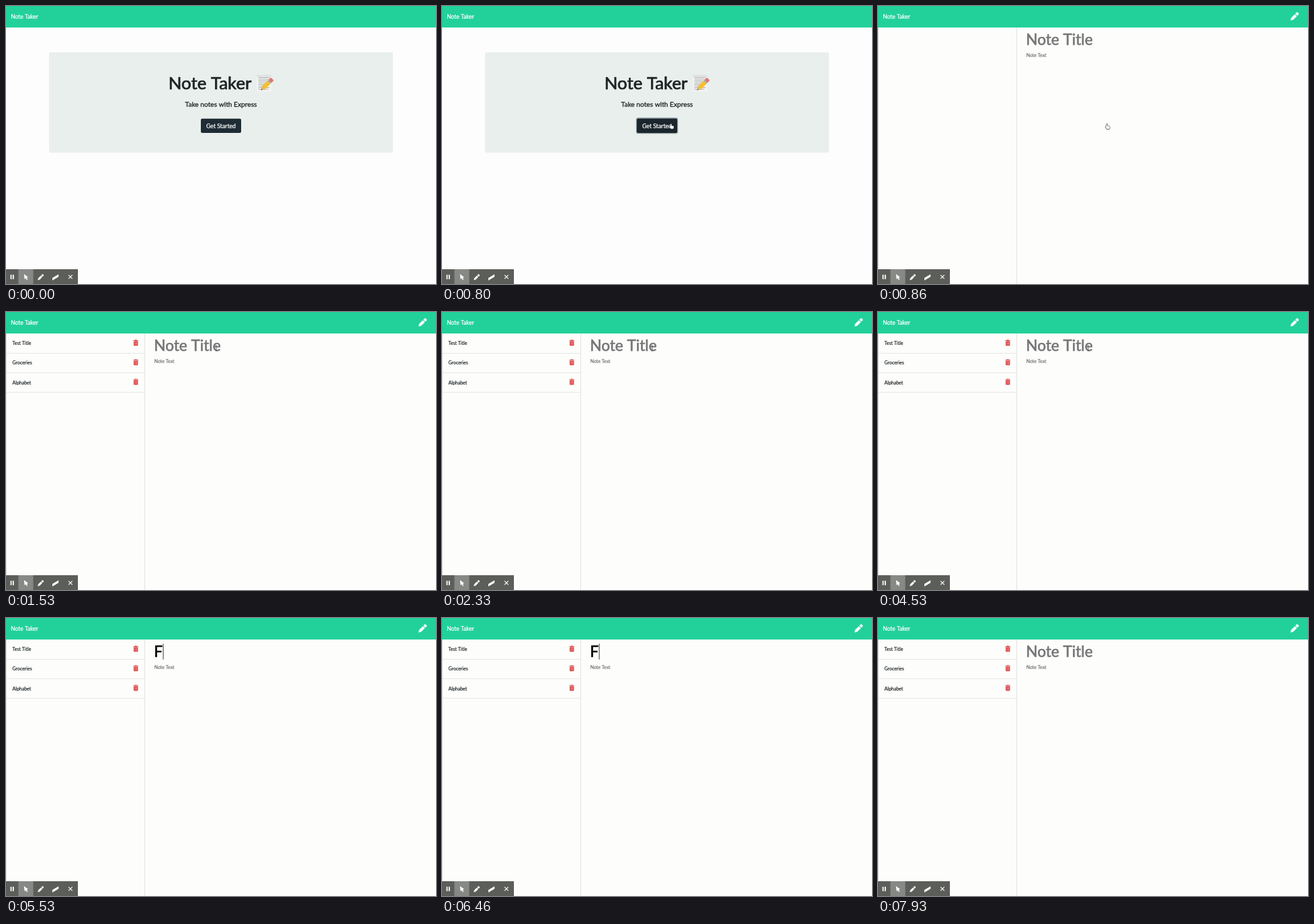
Recreate the animation shown at these times as an HTML page with a canvas. Size 640 px wide and 414 px high, loop 8 s.

```html
<!DOCTYPE html>
<html lang="en">
<head>
<meta charset="utf-8">
<title>Note Taker</title>
<style>
html, body { margin: 0; width: 100%; height: 100%; overflow: hidden; background: #fefefe; }
canvas { display: block; width: 640px; height: 414px; }
</style>
</head>
<body>
<canvas id="stage"></canvas>
<script>
const W = 640, H = 414, LOOP = 8000;
const GREEN = '#22d19a', INK = '#1d2224', RED = '#dc4545', MUTED = '#757575';
const BLINK = 500;

// Moments of the story, in ms.
const CLICK = 800, OPEN = 860, LIST = 930, FOCUS = 1800;
const TYPE = 5530, ERASE = 6060, RETYPE = 6460, CLEAR = 7930;

const canvas = document.getElementById('stage');
const ctx = canvas.getContext('2d');
const dpr = window.devicePixelRatio || 1;
canvas.width = W * dpr;
canvas.height = H * dpr;

function rect(x, y, w, h, color) {
  ctx.fillStyle = color;
  ctx.fillRect(x, y, w, h);
}

function round(x, y, w, h, r, color) {
  ctx.fillStyle = color;
  ctx.beginPath();
  ctx.roundRect(x, y, w, h, r);
  ctx.fill();
}

function line(x1, y1, x2, y2, color, width) {
  ctx.strokeStyle = color;
  ctx.lineWidth = width;
  ctx.beginPath();
  ctx.moveTo(x1, y1);
  ctx.lineTo(x2, y2);
  ctx.stroke();
}

function wedge(x, half, color) {
  ctx.fillStyle = color;
  ctx.beginPath();
  ctx.moveTo(0, 0);
  ctx.lineTo(x, -half);
  ctx.lineTo(x, half);
  ctx.fill();
}

// A thin stroke gives the slightly heavy look of screen text.
function text(str, x, y, size, color, align = 'left') {
  ctx.font = `400 ${size}px Lato, sans-serif`;
  ctx.textAlign = align;
  ctx.fillStyle = ctx.strokeStyle = color;
  ctx.lineWidth = size * 0.028;
  ctx.lineJoin = 'round';
  ctx.fillText(str, x, y);
  ctx.strokeText(str, x, y);
}

function at(x, y, angle, scale, paint) {
  ctx.save();
  ctx.translate(x, y);
  ctx.rotate(angle);
  ctx.scale(scale, scale);
  paint();
  ctx.restore();
}

// Pen with its tip at x, y, pointing to the lower left.
function pen(x, y, length, color, half = 2, tip = color, cap = color) {
  at(x, y, -Math.PI / 4, length / 15, () => {
    wedge(3, half, tip);
    rect(3, -half, 7.5, half * 2, color);
    round(11.4, -half, 3.6, half * 2, [0, 1, 1, 0], cap);
  });
}

function trash(x, y) {
  rect(x, y + 0.9, 7.4, 1.1, RED);
  rect(x + 2.3, y, 2.8, 1, RED);
  round(x + 0.5, y + 2.4, 6.4, 6.6, 0.8, RED);
  for (let i = 0; i < 3; i++) rect(x + 1.8 + i * 1.6, y + 3.6, 0.45, 4.2, '#f3c4c1');
}

function memo(x, y) {
  round(x, y, 22, 25, 1, '#f3f4f2');
  rect(x, y, 22, 3, '#dfe1e0');
  for (let i = 0; i < 8; i++) {
    const row = y + 4 + i * 2.5;
    line(x + 2.5, row, x + 19.5 - (i % 3) * 2, row, '#a4a9a9', 0.9);
  }
  pen(x + 6.5, y + 23, 24, '#f5c02f', 2, '#d9b27f', '#dd7a70');
  at(x + 6.5, y + 23, -Math.PI / 4, 1, () => {
    wedge(2, 0.9, '#444');
    rect(16.5, -3.2, 2, 6.4, '#a9b4b8');
  });
}

function toolbar() {
  rect(0, 392, 107, 22, '#5c5e5a');
  rect(18.4, 392, 22.2, 22, '#878986');
  for (const x of [6.6, 9.9]) rect(x, 400.2, 1.8, 6.6, '#fff');
  at(26.7, 399.3, Math.PI * 0.33, 1, () => {
    wedge(7, 3, '#fff');
    rect(6, -0.8, 3.6, 1.6, '#fff');
  });
  pen(47.3, 408.2, 11.5, '#fff');
  ctx.save();
  ctx.transform(1, -0.6, 0, 1, 69, 405);
  rect(0, 0, 9.2, 3.7, '#fff');
  ctx.restore();
  for (const d of [-2.8, 2.8]) line(95.9 - d, 400.6, 95.9 + d, 406.2, '#fff', 1.2);
}

function hand(x, y) {
  const shape = new Path2D();
  shape.roundRect(x - 1.9, y - 3.6, 1.5, 5, 0.7);
  shape.roundRect(x - 2.2, y - 0.5, 5, 4.3, 1.2);
  shape.roundRect(x - 3.2, y, 2, 1.8, 0.8);
  ctx.strokeStyle = '#333';
  ctx.lineWidth = 1.2;
  ctx.stroke(shape);
  ctx.fillStyle = '#fff';
  ctx.fill(shape);
}

function arrow(x, y) {
  at(x, y, Math.PI * 0.36, 1, () => {
    wedge(5.5, 2.3, '#222');
    rect(5, -0.6, 2.5, 1.2, '#222');
  });
}

function beam(x, y) {
  line(x, y - 4, x, y + 4, '#555', 0.8);
  for (const d of [-4, 4]) line(x - 1.3, y + d, x + 1.3, y + d, '#555', 0.6);
}

function glide(t, start, end, from, to) {
  const p = Math.min(1, Math.max(0, (t - start) / (end - start)));
  const e = p * p * (3 - 2 * p);
  return from.map((v, i) => v + (to[i] - v) * e);
}

function home(t) {
  round(64, 69, 512, 149.5, 2.5, '#e9efec');
  text('Note Taker', 241.8, 123.5, 25.8, INK);
  memo(373, 102.5);
  text('Take notes with Express', 320, 150.4, 10.2, INK, 'center');

  const [x, y] = glide(t, 130, 660, [404, 210], [342, 179]);
  const over = x < 350 && y < 189;
  if (t >= CLICK) round(288.8, 166.3, 62.4, 24, 3.2, '#8a979d');
  round(290, 167.7, 60, 21.3, 2, over ? '#1a252c' : '#1f2c35');
  text('Get Started', 320, 181.5, 8.7, '#fff', 'center');
  if (t >= 130) (over ? hand : arrow)(x, y);
}

// The caret starts a new blink cycle at every edit.
function caretOn(t) {
  if (t < FOCUS || t >= CLEAR) return false;
  const last = Math.max(...[FOCUS, TYPE, ERASE, RETYPE].filter(e => e <= t));
  return Math.floor((t - last) / BLINK) % 2 === 0;
}

function list() {
  ['Test Title', 'Groceries', 'Alphabet'].forEach((name, i) => {
    const y = 32 + i * 29.1, edge = Math.round(y + 29) + 0.5;
    text(name, 9.6, y + 17.3, 6.95, INK);
    trash(189.5, y + 9.2);
    line(1, edge, 206, edge, '#e6e8e5', 1);
  });
}

function notes(t) {
  for (const x of [0.5, 206.5]) line(x, 32, x, H, '#e1e3e1', 1);
  pen(614, 21.6, 16, '#fff');

  if (t >= LIST) {
    ctx.globalAlpha = t < LIST + 70 ? 0.6 : 1;
    list();
    ctx.globalAlpha = 1;
  }

  const typed = (t >= TYPE && t < ERASE) || (t >= RETYPE && t < CLEAR);
  text(typed ? 'F' : 'Note Title', 220.3, 57.8, 22.6, typed ? '#000' : MUTED);
  text('Note Text', 220.8, 76, 6.95, MUTED);
  if (caretOn(t)) rect(typed ? 233.6 : 221, 38.3, 0.9, 23.5, '#222');

  if (t < TYPE) {
    const [x, y] = glide(t, 1200, 1500, [342, 179.5], [313, 54]);
    const cursor = t < 1200 ? hand : y > 80 ? arrow : beam;
    cursor(x, y);
  }
}

function draw(t) {
  ctx.setTransform(dpr, 0, 0, dpr, 0, 0);
  rect(0, 0, W, H, t < OPEN ? '#fdfdfd' : '#fdfefc');
  rect(0, 0, W, 32, GREEN);
  text('Note Taker', 7.2, 19.2, 8.5, '#fff');
  (t < OPEN ? home : notes)(t);
  toolbar();
}

const begin = performance.now();
function tick() {
  draw((performance.now() - begin) % LOOP);
  requestAnimationFrame(tick);
}
tick();
</script>
</body>
</html>
```
